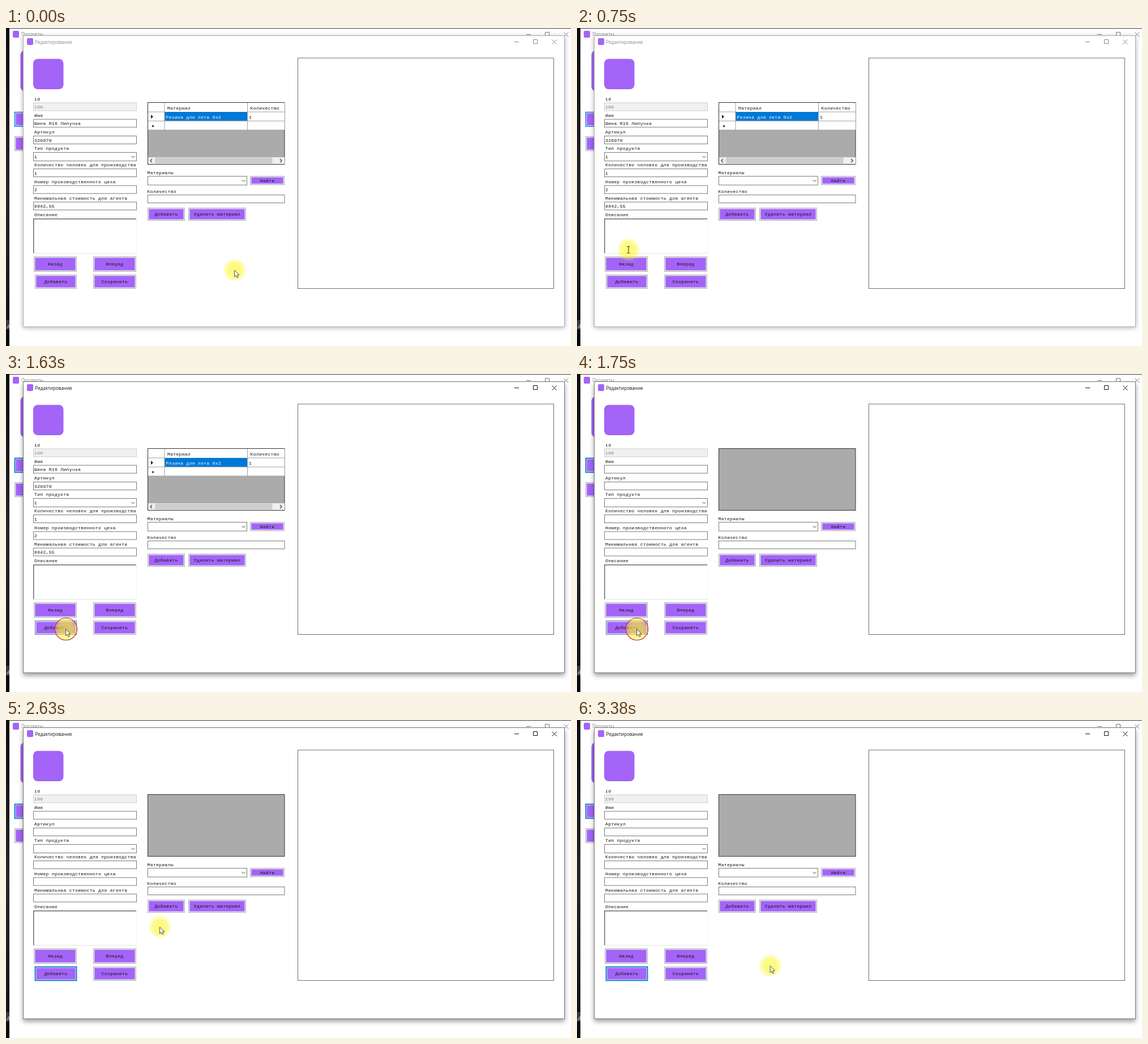
Animation of 998 by 561 pixels, one loop 4510 ms. Source, as an HTML page:

```html
<!DOCTYPE html>
<html lang="ru">
<head>
<meta charset="utf-8">
<title>Редактирование</title>
<style>
  html, body { margin: 0; width: 100%; height: 100%; overflow: hidden; background: #fff; }
  svg { display: block; width: 998px; height: 561px; }
  text { white-space: pre; }
  .mono { font: 8px "Liberation Mono", "Courier New", monospace; letter-spacing: .34px; fill: #111; }
  .ui { font: 8.05px "Open Sans", "Noto Sans", sans-serif; }
</style>
</head>
<body>
<svg id="stage" viewBox="0 0 998 561" xmlns="http://www.w3.org/2000/svg">
  <defs>
    <radialGradient id="glow">
      <stop offset="0" stop-color="#fbf400" stop-opacity=".52"/>
      <stop offset=".55" stop-color="#fbf600" stop-opacity=".48"/>
      <stop offset=".82" stop-color="#fdf800" stop-opacity=".26"/>
      <stop offset="1" stop-color="#fff900" stop-opacity="0"/>
    </radialGradient>
    <linearGradient id="desk" x2="0" y2="1">
      <stop offset="0" stop-color="#0b0b0d"/>
      <stop offset=".5" stop-color="#26272a"/>
      <stop offset=".9" stop-color="#141416"/>
      <stop offset="1" stop-color="#050505"/>
    </linearGradient>
    <filter id="soft" x="-5%" y="-5%" width="110%" height="110%"><feGaussianBlur stdDeviation="4"/></filter>
  </defs>
</svg>
<script>
const NS = 'http://www.w3.org/2000/svg';
const stage = document.getElementById('stage');
const PURPLE = '#a364f7', BLUE = '#0078d7';

function el(tag, attrs, parent = stage) {
  const node = document.createElementNS(NS, tag);
  for (const key in attrs) node.setAttribute(key, attrs[key]);
  return parent.appendChild(node);
}
const group = (parent = stage) => el('g', {}, parent);
const fill = (x, y, w, h, color, parent, rx = 0) =>
  el('rect', { x, y, width: w, height: h, rx, fill: color }, parent);
const frame = (x, y, w, h, stroke, color = '#fff', parent) =>
  el('rect', { x: x + .5, y: y + .5, width: w - 1, height: h - 1, fill: color, stroke }, parent);
const line = (d, stroke, parent, width = 1) =>
  el('path', { d, stroke, fill: 'none', 'stroke-width': width }, parent);

function label(x, y, str, parent, attrs = {}) {
  const node = el('text', { x, y, class: 'mono', ...attrs }, parent);
  node.textContent = str;
  return node;
}
function button(x, y, w, h, str) {
  const edge = frame(x, y, w, h, '#b2b2b2', '#e8e4ee');
  fill(x + 2.4, y + 2.4, w - 4.8, h - 4.8, PURPLE);
  label(x + w / 2, y + h / 2 + 2.6, str, stage, { 'text-anchor': 'middle' });
  return edge;
}
function combo(x, y, w, h) {
  frame(x, y, w, h, '#7a7a7a');
  line(`M${x + w - 9.5} ${y + h / 2 - 1.2}l3 3 3-3`, '#444');
}
function windowKeys(x, y, color) {
  const g = group();
  g.setAttribute('stroke', color);
  g.setAttribute('fill', 'none');
  el('path', { d: `M${x} ${y + .5}h8` }, g);
  el('path', { d: `M${x + 33.5} ${y - 3.5}h7v7h-7z` }, g);
  el('path', { d: `M${x + 66.5} ${y - 3.5}l8 8m0-8l-8 8` }, g);
  return g;
}

// Desktop strip and the window behind
fill(0, 0, 6, 561, 'url(#desk)');
fill(0, 515, 6, 17, '#38393b');
label(2, 528, 'Д', stage, { style: 'fill:#ddd;font-style:italic' });
fill(6, 0, 992, 1, '#3c3c3c');
fill(12, 5, 11, 12, PURPLE, stage, 2);
label(27, 14.4, 'Продукты', stage, { class: 'ui', fill: '#8a8a8a' });
windowKeys(919, 11, '#777');
fill(25.5, 39.5, 54, 72, PURPLE, stage, 8);
const backEdge = button(15, 148, 80, 26, '');
backEdge.setAttribute('stroke', BLUE);
button(15, 191, 80, 26, '');

// Front window
const shadow = el('rect', { x: 30, y: 15, width: 957, height: 514, fill: '#000', filter: 'url(#soft)' });
const border = frame(30, 13, 957, 514.5, '#aaa');
fill(37, 18, 11, 12, PURPLE, stage, 2);
const title = label(51.5, 27.5, 'Редактирование', stage, { class: 'ui' });
const keys = windowKeys(898, 24, '#888');
fill(48, 54.5, 53.5, 53.5, PURPLE, stage, 8);
frame(515, 52.5, 453, 407.5, '#6e6e6e');

// Left column
[['id', 127.5], ['Имя', 156.5], ['Артикул', 186], ['Тип продукта', 215],
 ['Количество человек для производства', 244], ['Номер производственного цеха', 273.5],
 ['Минимальная стоимость для агента', 302.5], ['Описание', 332]]
  .forEach(([str, y]) => label(50, y, str));
frame(48, 131.5, 183, 15, '#cfcfcf', '#f0f0f0');
label(50, 142, '100', stage, { style: 'fill:#808080' });
[160.5, 190, 248, 277.5, 306.5].forEach(y => frame(48, y, 183, 15, '#7a7a7a'));
combo(48, 219, 183, 16);
fill(48, 336, 182.5, 62, '#e3e3e3');
fill(48, 336, 182, 61, '#696969');
fill(49.5, 337.5, 180.5, 59.5, '#fff');

const values = group();
[['Шина R16 Липучка', 171], ['320970', 200.5], ['1', 230], ['1', 258.5],
 ['2', 288], ['8042,55', 317]].forEach(([str, y]) => label(50, y, str, values));

button(49, 403, 76, 27, 'Назад');
button(154, 403, 76, 27, 'Вперед');
const addEdge = button(51, 435, 74, 25, 'Добавить');
button(154, 435, 76, 25, 'Сохранить');

// Materials
frame(250, 131, 242.5, 110, '#333', '#ababab');
const grid = group();
fill(251, 132, 241, 48, '#fff', grid);
fill(280, 148, 146, 16, BLUE, grid);
line('M251 148h29m146 0h66M251 164h241M251 180h241M280 132v48M426.5 132v48', '#a0a0a0', grid);
label(285, 143.5, 'Материал', grid);
label(431.5, 143.5, 'Количество', grid);
label(282.5, 159.5, 'Резина для лета 0х2', grid, { style: 'fill:#fff' });
label(429, 159.5, '1', grid);
el('path', { d: 'M256 153l4 3.5-4 3.5z', fill: '#222' }, grid);
el('circle', { cx: 259.5, cy: 173, r: 1.8, fill: '#333' }, grid);
fill(251, 228, 241, 12, '#f0f0f0', grid);
fill(263, 228.5, 207.5, 10.5, '#cdcdcd', grid);
line('M258 231l-3 3 3 3M484 231l3 3-3 3', '#444', grid, 1.3);

label(249.5, 257.5, 'Материалы');
combo(250, 261, 176, 16.5);
button(431, 261, 61, 16, 'Найти');
label(249.5, 290.5, 'Количество');
frame(250, 294, 242.5, 15, '#7a7a7a');
button(250, 317, 66, 23, 'Добавить');
button(322, 317, 102, 23, 'Удалить материал');

// Pointer
const pointer = group();
el('circle', { r: 21, fill: 'url(#glow)' }, pointer);
const ring = el('circle', { r: 19.5, fill: 'rgba(255,245,90,.28)', stroke: '#c8323c', 'stroke-width': 1.2 }, pointer);
const arrow = el('path', {
  d: 'M-.3 .3v11.6l2.6-2.5 2 4.2 1.9-.9-1.9-4.1h3.6z',
  fill: '#fff', stroke: '#222', 'stroke-width': .8
}, pointer);
const beam = line('M-2.5-5.5h2l.5.5.5-.5h2M0-5v10.5M-2.5 6h2l.5-.5.5.5h2', '#222', pointer);

// Time, x, y of each pointer stop
const path = [
  [0, 404, 427], [250, 378, 398], [380, 329.5, 351], [630, 200, 366], [750, 91, 391],
  [1000, 97, 428], [1250, 102.5, 448], [1380, 106, 450], [2250, 132, 439],
  [2380, 206, 400], [2630, 272, 365], [2750, 327, 389], [3000, 341, 421], [3250, 342, 431], [3380, 341.5, 433.5]
];
const LOOP = 4510, HOVER = 1250, PRESS = 1630, CLEAR = 1750, RELEASE = 2000;
const show = (node, on) => node.setAttribute('visibility', on ? 'visible' : 'hidden');

function draw(t) {
  const [at, x, y] = path.filter(p => p[0] <= t).pop();
  pointer.setAttribute('transform', `translate(${x} ${y})`);
  const typing = at === 750;
  show(arrow, !typing);
  show(beam, typing);
  show(ring, t >= PRESS && t < RELEASE);

  const active = t >= PRESS;
  title.setAttribute('fill', active ? '#111' : '#8a8a8a');
  keys.setAttribute('stroke', active ? '#111' : '#888');
  border.setAttribute('stroke', active ? '#777' : '#aaa');
  shadow.setAttribute('opacity', active ? .38 : .3);
  shadow.setAttribute('y', active ? 18 : 15);
  backEdge.setAttribute('stroke-width', active ? 1.8 : 1.4);

  addEdge.setAttribute('stroke', t < HOVER ? '#b2b2b2' : t < RELEASE ? '#4d7dae' : BLUE);
  addEdge.setAttribute('stroke-width', t < RELEASE ? 1 : 1.8);
  show(values, t < CLEAR);
  show(grid, t < CLEAR);
}
function tick() {
  draw(performance.now() % LOOP);
  requestAnimationFrame(tick);
}
tick();
</script>
</body>
</html>
```
